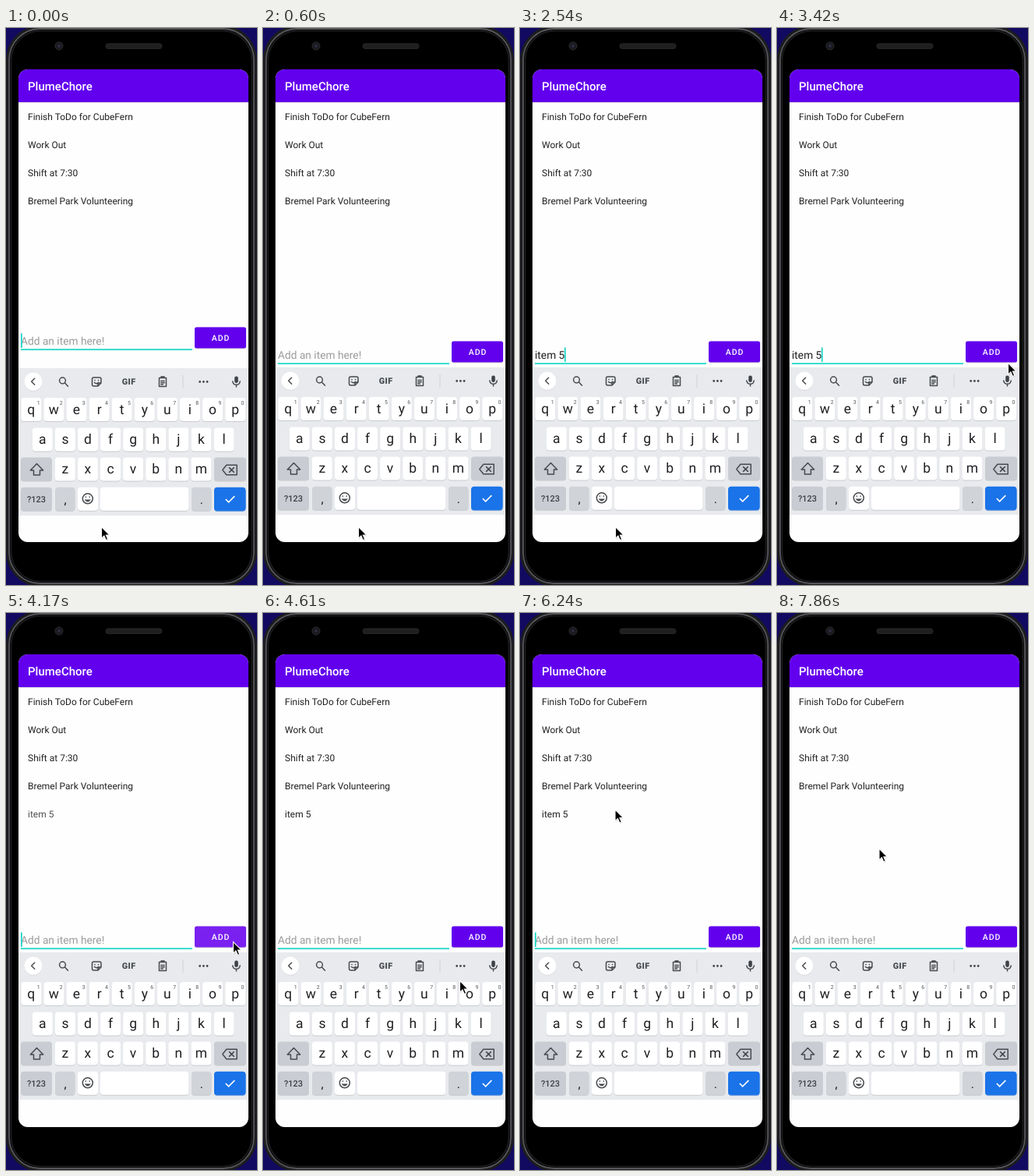
These frames come from a looping animation (322x714 px, 8 s). An HTML page:

```html
<!DOCTYPE html>
<html lang="en">
<head>
<meta charset="utf-8">
<title>List app</title>
<style>
html, body { margin: 0; width: 100%; height: 100%; overflow: hidden; background: #110a60; }
svg { display: block; width: 322px; height: 714px; font-family: Roboto, sans-serif; }
text { white-space: pre; text-rendering: geometricPrecision; }
.mid { text-anchor: middle; }
.icon { fill: none; stroke: #474a4e; stroke-width: 1.5; stroke-linecap: round; stroke-linejoin: round; }
</style>
</head>
<body>
<svg id="stage" viewBox="0 0 322 714">
  <defs>
    <clipPath id="glass"><rect x="16" y="53" width="295" height="606" rx="12"/></clipPath>
  </defs>
  <rect x="0" y="-3" width="322" height="719" rx="44" fill="#1c1c1e"/>
  <rect x="4" y="1" width="314" height="711" rx="40" fill="#000" stroke="#56585b" stroke-width="1.8"/>
  <rect x="6.500" y="3.500" width="309" height="706" rx="38" fill="none" stroke="#1b1b1d" stroke-width="2"/>
  <rect x="128" y="20" width="72" height="6.5" rx="3" fill="#1f1f20" stroke="#2c2c2d" stroke-width=".8"/>
  <circle cx="68" cy="23" r="5" fill="#19191d" stroke="#2c2c31"/>
  <circle cx="68" cy="23" r="2" fill="#2b2d45"/>
  <g clip-path="url(#glass)">
    <rect x="16" y="53" width="295" height="606" fill="#fefefe"/>
    <rect x="16" y="95" width="295" height="1" fill="#d9d3e4"/>
    <rect x="16" y="53" width="295" height="42" fill="#6200ee"/>
    <text x="28" y="80" font-size="15" font-weight="500" fill="#fff">PlumeChore</text>
    <g id="list" font-size="12" fill="#212121"></g>
    <g id="entry">
      <rect x="19" y="429.3" width="220" height="1.8" fill="#22d8c8"/>
      <text id="hint" x="19" y="424" font-size="13.75" fill="#9b9b9b">Add an item here!</text>
      <text id="typed" x="19" y="424" font-size="13.75" fill="#212121"></text>
      <rect id="under" x="19" y="425.3" height="1" fill="#333"/>
      <rect id="caret" y="409.5" width="1.8" height="18.5" fill="#22d8c8"/>
      <rect x="242" y="402.4" width="66" height="27" rx="2.5" fill="#000" opacity=".16"/>
      <rect id="button" x="242" y="401.5" width="66" height="27" rx="2.5"/>
      <text class="mid" x="275.6" y="418.8" font-size="10.5" font-weight="500" letter-spacing="1" fill="#fff">ADD</text>
    </g>
    <g id="board">
      <rect x="16" y="435" width="295" height="189" fill="#e8eaed"/>
      <circle cx="35" cy="453" r="11.5" fill="#d3d6d9"/>
      <circle cx="35" cy="452.3" r="11.5" fill="#fff"/>
      <path id="chevron" class="icon"/>
      <g id="tools">
        <g class="icon">
          <circle cx="72.5" cy="451" r="3.9"/><path d="M75.5 454 79.5 458.3"/>
          <path d="M112.5 447h7.5q2 0 2 2v5l-4 4h-5.5q-2 0-2-2v-7q0-2 2-2zM122 454h-2q-2 0-2 2v2M113.5 453.5q2.5 2.5 5 0M114 450.5v.2M118.5 450.5v.2"/>
          <path d="M196.5 447.5h9v11h-9zM199 447.5v-1.5h4v1.5zM198.8 451.5h4.4M198.8 453.8h4.4M198.8 456h2.6"/>
        </g>
        <text class="mid" x="157.7" y="456.3" font-size="10.8" font-weight="900" letter-spacing=".4" fill="#474a4e">GIF</text>
        <rect x="226.5" y="444" width="1" height="17" fill="#cfd1d5"/>
        <g fill="#474a4e"><circle cx="248.7" cy="452.5" r="1.4"/><circle cx="253.4" cy="452.5" r="1.4"/><circle cx="258.1" cy="452.5" r="1.4"/></g>
      </g>
      <g id="words" font-size="14" fill="#55585c">
        <rect x="120" y="444" width="1" height="17" fill="#cfd1d5"/>
        <rect x="205" y="444" width="1" height="17" fill="#cfd1d5"/>
      </g>
      <rect x="293.2" y="445.5" width="4.6" height="8.5" rx="2.3" fill="#3f4246"/>
      <path class="icon" d="M290.8 452q.4 4.300 4.700 4.300t4.700-4.300M295.500 456.500v2.500"/>
      <g id="keys"></g>
      <path class="icon" d="M39.500 557.500 47.700 566h-4.200v6h-8v-6h-4.200z"/>
      <path class="icon" d="M282.800 559.300h13.400v12.400h-13.400l-5-6.200zM286.500 562.600l5.800 5.800M292.300 562.600l-5.800 5.800"/>
      <g class="icon"><circle cx="104.800" cy="602.300" r="6.500"/><path d="M101.300 604q3.500 4.500 7 0z" fill="#474a4e" stroke-width=".6"/><path d="M102.400 600.100v.2M107.200 600.100v.2"/></g>
      <path d="M281.800 603 285.600 606.800 293.300 599.100" fill="none" stroke="#fff" stroke-width="1.600"/>
    </g>
  </g>
  <g id="pointer">
    <path d="M1 2V16.500L4.500 13.500 7 18.500 9.500 17.500 7.300 12.300H11.500Z" fill="#000" opacity=".18"/>
    <path d="M.5 .5V15.200L3.900 12 6.300 17.500 8.700 16.500 6.400 11.100H11Z" fill="#000" stroke="#fff" stroke-width="1.100"/>
  </g>
</svg>
<script>
const LOOP = 8000, TICK = 148.3;
const $ = id => document.getElementById(id);

function add(parent, tag, attrs, label) {
  const el = document.createElementNS("http://www.w3.org/2000/svg", tag);
  for (const name in attrs) el.setAttribute(name, attrs[name]);
  if (label) el.textContent = label;
  parent.appendChild(el);
  return el;
}
const set = (id, name, value) => $(id).setAttribute(name, value);
const show = (id, on) => set(id, "visibility", on ? "visible" : "hidden");

// Task list
const tasks = ["Finish ToDo for CubeFern", "Work Out", "Shift at 7:30", "Bremel Park Volunteering", "item 5"];
const rows = tasks.map((task, i) => add($("list"), "text", { x: 28, y: 118 + 36 * i }, task));
const newRow = rows[4];

// Keyboard
const GREY = "#c9ccd2", PALE = "#d0d3d8", WHITE = "#fff", BLUE = "#1a73e8";
function key(x, y, w, fill) {
  const shade = fill === BLUE ? "#5b93dc" : "#c9ccd0";
  add($("keys"), "rect", { x, y: y + 1, width: w, height: 30, rx: 4, fill: shade });
  add($("keys"), "rect", { x, y, width: w, height: 30, rx: 4, fill });
}
function label(text, x, y, size, fill = "#1f2023", weight = 400) {
  add($("keys"), "text", { x, y, class: "mid", "font-size": size, fill, "font-weight": weight }, text);
}
[["qwertyuiop", 32.3, 473], ["asdfghjkl", 46.8, 511.5], ["zxcvbnm", 75.8, 549.5]].forEach(([letters, x0, y], r) => {
  [...letters].forEach((c, i) => {
    const x = x0 + 29.1 * i;
    key(x - 13, y, 26, WHITE);
    label(c, x, y + 20.5, 17.5);
    if (!r) label((i + 1) % 10 + "", x + 9.3, y + 9, 7, "#55585c");
  });
});
key(19, 549.5, 40, GREY);
key(267, 549.5, 41, GREY);
[[19, 40, GREY], [63, 25.5, PALE], [92, 26, WHITE], [121, 113.5, WHITE], [238, 25.5, PALE], [267, 40.5, BLUE]]
  .forEach(([x, w, fill]) => key(x, 587.7, w, fill));
label("?123", 39, 607, 11, "#3c4043", 500);
label(",", 76, 609, 16);
label(".", 250.8, 609, 16);

const words = [82, 162.5, 243.5].map(x => add($("words"), "text", { x, y: 457.5, class: "mid" }));

// Every schedule below counts in ticks
const typing = [[0, ""], [7, "i"], [8, "it"], [9, "ite"], [10, "item"], [14, "item "], [15, "item 5"], [28, ""]];
const guesses = [[0, ""], [8, "i I I'm"], [9, "it I it's"], [10, "ite it's item"], [11, "items item itemized"], [14, "is in for"], [17, ""]];
const caretOff = [[4, 7], [19, 22], [25, 28], [31, 34], [38, 41], [44, 48], [51, 54]];
const rowAlpha = [[0, 0], [28, 0.78], [29, 1], [50, 0.5], [51, 0]];
const buttonFill = [[0, "#6200ee"], [27, "#7010ef"], [28, "#7a20f0"], [29, "#6909ee"], [30, "#6200ee"]];
const route = [
  [0, 122, 639], [17, 122, 639], [19, 150, 608], [21, 235, 500], [23, 296, 429], [24, 291, 421],
  [29, 291, 421], [31, 252, 471], [32, 222, 483], [33, 165, 400], [34, 136, 297], [35, 147, 267],
  [36, 147, 267], [37, 146, 269], [38, 144, 270], [39, 144, 270], [40, 136, 262], [42, 121.5, 251.5],
  [44, 121, 251], [47, 121, 251], [48, 120, 251], [50, 120, 251], [51, 119, 251], [52, 119, 251], [53, 130.5, 301.5]
];

const at = (steps, k) => steps.filter(s => s[0] <= k).pop()[1];

function place(k) {
  const i = route.findIndex(p => p[0] >= k);
  if (i < 1) return route[i < 0 ? route.length - 1 : 0].slice(1);
  const [a, b] = [route[i - 1], route[i]];
  const u = (k - a[0]) / (b[0] - a[0]);
  return [a[1] + (b[1] - a[1]) * u, a[2] + (b[2] - a[2]) * u];
}

function draw(ms) {
  const k = Math.floor((ms % LOOP) / TICK);
  const text = at(typing, k), guess = at(guesses, k);

  set("entry", "transform", `translate(0 ${k < 1 ? -18 : 0})`);
  set("board", "transform", `translate(0 ${k < 1 ? 1 : 0})`);

  $("typed").textContent = text;
  const width = text ? $("typed").getComputedTextLength() : 0;
  show("hint", !text);
  show("under", text && k < 14);
  set("under", "width", width);
  set("caret", "x", 19 + Math.max(0, width - 0.4));
  show("caret", !caretOff.some(([a, b]) => k >= a && k < b));

  show("tools", !guess);
  show("words", guess);
  guess.split(" ").forEach((w, i) => words[i].textContent = w);
  set("chevron", "d", guess ? "M33.3 448.3 37.3 452.3 33.3 456.3" : "M36.7 448.3 32.7 452.3 36.7 456.3");

  set("button", "fill", at(buttonFill, k));
  newRow.setAttribute("opacity", at(rowAlpha, k));
  set("pointer", "transform", `translate(${place(k)})`);
}

let start;
function loop(now) {
  if (start === undefined) start = now;
  draw(now - start);
  requestAnimationFrame(loop);
}
draw(0);
requestAnimationFrame(loop);
</script>
</body>
</html>
```
